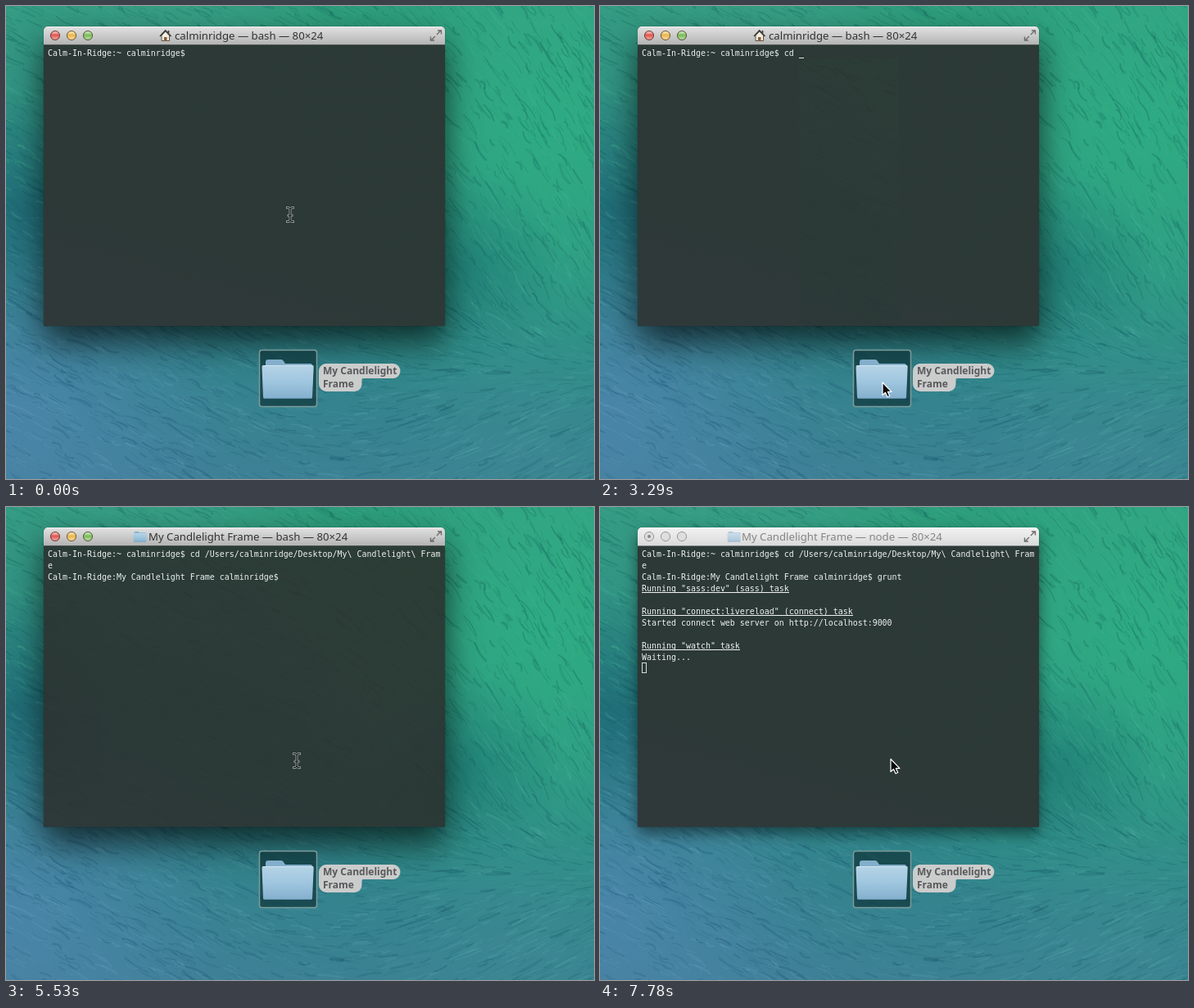
These frames come from a looping animation (718x578 px, 8000 ms). An HTML page with a canvas:

```html
<!DOCTYPE html>
<html lang="en">
<head>
<meta charset="utf-8">
<title>Terminal demo</title>
<style>
  html, body { margin: 0; width: 718px; height: 578px; overflow: hidden; }
  body { position: relative; background: #35898a; }
  canvas, svg { position: absolute; left: 0; top: 0; }
  #win {
    position: absolute; left: 46px; top: 25px; width: 490px; height: 366px;
    border-radius: 5px 5px 0 0; box-shadow: 0 0 1px rgba(0,0,0,.7), 0 20px 42px rgba(0,0,0,.68);
  }
  #win.idle { box-shadow: 0 0 1px rgba(0,0,0,.5), 0 8px 18px rgba(0,0,0,.5); }
  #bar {
    height: 22px; border-radius: 5px 5px 0 0; border-bottom: 1px solid #4d5453; box-sizing: content-box;
    background: linear-gradient(#f2f2f2, #dedede 8%, #b4b4b4);
  }
  .idle #bar { background: linear-gradient(#fafafa, #f0f0f0 10%, #dadada); border-color: #7b8281; }
  #pane { position: relative; height: 343px; background: rgba(44,47,45,.88); }
  #cover { position: absolute; inset: 0; background: linear-gradient(15deg, #30393a, #2c3936 40%); opacity: .9; }
  text { white-space: pre; }
  .mono { font: 9.966px "DejaVu Sans Mono", monospace; fill: #eef2f0; }
  #title { font: 13.2px "Noto Sans", "Open Sans", sans-serif; fill: #333; }
  .label { font: bold 12px "Noto Sans", "Open Sans", sans-serif; fill: #59595b; }
  .idleArt, .idle .liveArt { display: none; }
  .idle .idleArt { display: inline; }
  .idle #title { fill: #858585; }
  .idle #glyph { opacity: .6; }
</style>
</head>
<body>
<canvas id="sea" width="718" height="578"></canvas>
<div id="win"><div id="bar"></div><div id="pane"><div id="cover"></div></div></div>

<svg id="ui" width="718" height="578" viewBox="0 0 718 578">
  <defs>
    <linearGradient id="blue" x2="0" y2="1">
      <stop stop-color="#b5d3e6"/><stop offset=".5" stop-color="#9fc6df"/><stop offset="1" stop-color="#83afcd"/>
    </linearGradient>
    <linearGradient id="gloss" x2="0" y2="1">
      <stop stop-color="#fff" stop-opacity=".75"/><stop offset=".45" stop-color="#fff" stop-opacity=".05"/>
      <stop offset="1" stop-color="#fff" stop-opacity=".5"/>
    </linearGradient>
    <g id="folder">
      <path d="M317 441V435Q317 432 320 432H336Q338 432 339 434L341 437H372Q374 437 374 440V446H317Z" fill="#84aecb"/>
      <path d="M314 439H374Q376 439 375.700 441L374 478Q374 480 372 480H316Q314 480 314 478L312.500 441Q312.500 439 314 439Z" fill="url(#blue)"/>
      <path d="M314 439.500H374.500" stroke="#d2e6f2" fill="none"/>
      <path d="M315 479.500H373" stroke="#628ca8" fill="none"/>
    </g>
    <g id="tag">
      <path d="M390 437H473A8.500 9 0 0 1 473 455H436Q434.500 455 434.500 458V462A9 9 0 0 1 426 471H391A9 9 0 0 1 382 462V446A9 9 0 0 1 390 437Z" fill="#cbcccc"/>
      <text class="label" x="387" y="450">My Candlelight</text>
      <text class="label" x="387" y="466">Frame</text>
    </g>
  </defs>

  <rect x="309.500" y="420.500" width="70" height="69" rx="3" fill="#0c3136" fill-opacity=".68" stroke="#7d9c9b" stroke-width="1.500"/>
  <use href="#folder"/>
  <use href="#tag"/>

  <g id="lights"></g>
  <circle id="busy" cx="60" cy="36" r="2" fill="#4a1714"/>
  <g stroke="#6c6c6c" fill="none" stroke-width="1.400">
    <path d="M526 35L531 30M527 30H531.500V34.500M524 37L519 42M523 42H518.500V37.500"/>
  </g>
  <g id="glyph">
    <g id="home">
      <path d="M190 36V42.500H199.500V36L194.700 31Z" fill="#f4eee0" stroke="#54504a"/>
      <path d="M188 37L194.700 30L201.500 37M198.500 30V33" fill="none" stroke="#3f3c38" stroke-width="1.600"/>
      <path d="M193 43V38H196.500V43Z" fill="#8b5a38"/>
    </g>
    <use id="mini" href="#folder" transform="translate(73.500 -84) scale(.262 .264)"/>
  </g>
  <text id="title" y="41"></text>

  <g id="out" class="mono"></g>
  <rect id="caret"/>

  <g id="ghost" opacity=".55"><use href="#folder"/><use href="#tag"/></g>
  <g id="beam" fill="none" stroke-linecap="square">
    <path id="stem" d="M-3.500-8.500Q0-8.500 0-6Q0-8.500 3.500-8.500M0-6V6M-3.500 8.500Q0 8.500 0 6Q0 8.500 3.500 8.500M-2 1H2" stroke="#9aa5a2" stroke-width="2.600"/>
    <use href="#stem"/>
    <path d="M-3.500-8.500Q0-8.500 0-6Q0-8.500 3.500-8.500M0-6V6M-3.500 8.500Q0 8.500 0 6Q0 8.500 3.500 8.500M-2 1H2" stroke="#101413" stroke-width="1.200"/>
  </g>
  <path id="arrow" d="M0 0V15.500L3.500 12.300L6 17.700L8.700 16.500L6.300 11.300H11Z" fill="#080808" stroke="#fff" stroke-width="1.200" stroke-linejoin="round"/>
</svg>

<script>
const $ = id => document.getElementById(id);
const NS = 'http://www.w3.org/2000/svg';
const W = 718, H = 578, LOOP = 8000;

function add(parent, tag, attrs, text) {
  const el = document.createElementNS(NS, tag);
  for (const k in attrs) el.setAttribute(k, attrs[k]);
  if (text) el.textContent = text;
  parent.append(el);
}

// Wallpaper: soft colour fields with seeded streaks along a bent flow.
function paintSea() {
  const c = $('sea').getContext('2d');
  let seed = 11;
  const rnd = () => (seed = (seed * 16807) % 2147483647) / 2147483647;
  const ease = (a, b, v) => {
    const t = Math.min(1, Math.max(0, (v - a) / (b - a)));
    return t * t * (3 - 2 * t);
  };
  const base = c.createLinearGradient(120, 0, 0, H);
  base.addColorStop(0, '#369d83');
  base.addColorStop(.5, '#2b8685');
  base.addColorStop(1, '#427f9a');
  c.fillStyle = base;
  c.fillRect(0, 0, W, H);

  function blob(x, y, r, rgb, a) {
    const g = c.createRadialGradient(x, y, 0, x, y, r);
    g.addColorStop(0, `rgba(${rgb},${a})`);
    g.addColorStop(1, `rgba(${rgb},0)`);
    c.fillStyle = g;
    c.fillRect(0, 0, W, H);
  }
  blob(670, 150, 380, '45,172,130', .95);
  blob(430, 0, 200, '38,155,115', .5);
  blob(20, 490, 260, '78,134,174', .75);
  blob(20, 250, 150, '25,92,112', .6);
  blob(560, 320, 120, '20,100,105', .45);
  blob(640, 540, 220, '66,138,150', .5);

  c.lineCap = 'round';
  for (let i = 0; i < 5200; i++) {
    const x = rnd() * (W + 40) - 20, y = rnd() * (H + 40) - 20;
    const low = ease(330, 520, y) * ease(230, 560, x);
    const deg = (28 + 32 * ease(300, 700, x)) * (1 - low) - 24 * low + (rnd() - .5) * 14;
    const a = deg * Math.PI / 180, len = 8 + 38 * rnd() * rnd();
    const dx = Math.cos(a) * len, dy = Math.sin(a) * len, bend = (rnd() - .5) * 8;
    const wave = Math.sin((x * Math.sin(a) - y * Math.cos(a)) / 24 + x / 90);
    const dark = rnd() < .5 - .22 * wave;
    const blue = ease(150, 480, y) * (1 - ease(200, 700, x) * .6);
    c.strokeStyle = dark
      ? `rgba(${15 + 12 * blue},${95 - 12 * blue},${88 + 28 * blue},${.1 + .22 * rnd()})`
      : `rgba(${65 + 40 * blue},${180 - 18 * blue},${145 + 48 * blue},${.08 + .2 * rnd()})`;
    c.lineWidth = .8 + 2.6 * rnd() * rnd();
    c.beginPath();
    c.moveTo(x - dx / 2, y - dy / 2);
    c.quadraticCurveTo(x + bend, y - bend, x + dx / 2, y + dy / 2);
    c.stroke();
  }
}

function paintLights() {
  ['#dd4f48', '#eab244', '#74b84e'].forEach((fill, i) => {
    const spot = { cx: 60 + 20 * i, cy: 36, r: 5.6 };
    add($('lights'), 'circle', { ...spot, fill, stroke: 'rgba(60,40,30,.65)', class: 'liveArt' });
    add($('lights'), 'circle', { ...spot, r: 4.8, fill: 'url(#gloss)', class: 'liveArt' });
    add($('lights'), 'circle', { ...spot, fill: '#dedede', stroke: '#999', class: 'idleArt' });
  });
}

const USER = 'calminridge', HOST = 'Calm-In-Ridge', DIR = 'My Candlelight Frame';
const ask = `${HOST}:~ ${USER}$`;
const moved = [`${ask} cd /Users/${USER}/Desktop/My\\ Candlelight\\ Fram`, 'e'];
const ready = `${HOST}:${DIR} ${USER}$ `;
const typed = n => [...moved, ready + 'grunt'.slice(0, n)];
const sass = [...typed(5), 'Running "sass:dev" (sass) task', ''];
const serve = [...sass, 'Running "connect:livereload" (connect) task',
  'Started connect web server on http://localhost:9000', ''];
const watch = [...serve, 'Running "watch" task', 'Waiting...'];

const FLAT = 'none';
const STRIPE = "path(evenodd, 'M0 0H490V343H0ZM197 15H319V343H197Z')";
const CLEAR = 'inset(100%)';

// Each step changes only the named parts; caret is [column, row].
const steps = [
  [0, { name: USER, job: 'bash', text: [ask], caret: null, beam: [347, 255], arrow: null,
        drag: null, cover: FLAT, home: true, busy: false, idle: false }],
  [300, { caret: [29, 0] }],
  [750, { caret: null }],
  [1050, { text: [ask + ' c'], caret: [30, 0] }],
  [1350, { text: [ask + ' cd'], caret: [31, 0] }],
  [1650, { caret: [32, 0] }],
  [2100, { caret: null }],
  [2250, { beam: [349, 285], cover: STRIPE }],
  [2400, { beam: [353, 357], caret: [32, 0] }],
  [2550, { beam: null, arrow: [353, 440] }],
  [2700, { arrow: [350, 499] }],
  [2850, { arrow: [347, 477] }],
  [2990, { arrow: [345, 460], caret: null }],
  [3290, { caret: [32, 0] }],
  [3590, { arrow: [346, 440], drag: [1, -20] }],
  [3740, { arrow: [350, 388], drag: [5, -72], cover: CLEAR }],
  [3880, { arrow: [354, 325], drag: [9, -135] }],
  [4030, { arrow: null, drag: null, beam: [355, 310], text: moved, caret: [2, 1] }],
  [4930, { home: false, name: DIR, text: typed(0), caret: [48, 2] }],
  [5530, { caret: null }],
  [5980, { text: typed(1), caret: [49, 2] }],
  [6130, { text: typed(3), caret: [51, 2] }],
  [6280, { text: typed(4), caret: [52, 2] }],
  [6430, { text: typed(5), caret: [53, 2] }],
  [6730, { caret: null }],
  [6880, { caret: [0, 3], busy: true }],
  [7030, { job: 'node' }],
  [7180, { text: sass, caret: [0, 4] }],
  [7630, { job: 'open', text: serve, caret: [0, 7] }],
  [7780, { job: 'node', text: watch, caret: [0, 10], beam: null, arrow: [355, 308],
           cover: FLAT, idle: true }]
];
let last = {};
const scenes = steps.map(([at, change]) => ({ at, ...(last = { ...last, ...change }) }));

function place(id, pos) {
  $(id).style.display = pos ? '' : 'none';
  if (pos) $(id).setAttribute('transform', `translate(${pos})`);
}

function draw(s) {
  $('win').classList.toggle('idle', s.idle);
  $('ui').classList.toggle('idle', s.idle);
  $('cover').style.clipPath = s.cover;
  $('home').style.display = s.home ? '' : 'none';
  $('mini').style.display = s.home ? 'none' : '';
  $('busy').style.display = s.busy ? '' : 'none';
  $('busy').setAttribute('fill', s.idle ? '#888' : '#4a1714');
  $('title').textContent = `${s.name} — ${s.job} — 80×24`;
  $('title').setAttribute('x', s.home ? 206 : s.job === 'bash' ? 174 : 173);

  $('out').replaceChildren();
  s.text.forEach((line, row) => {
    const y = 61 + 14 * row;
    add($('out'), 'text', { x: 51, y }, line);
    if (line.startsWith('Running'))
      add($('out'), 'rect', { x: 51, y: y + 1, width: 6 * line.length, height: 1 });
  });

  const caret = $('caret');
  caret.style.display = s.caret ? '' : 'none';
  if (s.caret) {
    const x = 51 + 6 * s.caret[0], y = 63 + 14 * s.caret[1];
    const box = s.idle
      ? { x: x + .5, y: y - 12.5, width: 5, height: 12, fill: 'none', stroke: '#d5dad8' }
      : { x, y, width: 6, height: 1, fill: '#e4e8e6', stroke: 'none' };
    for (const k in box) caret.setAttribute(k, box[k]);
  }
  place('beam', s.beam);
  place('arrow', s.arrow);
  place('ghost', s.drag);
}

let shown = null;
const start = performance.now();
function tick() {
  const t = (performance.now() - start) % LOOP;
  const scene = scenes.findLast(s => s.at <= t);
  if (scene !== shown) draw(shown = scene);
  requestAnimationFrame(tick);
}
paintSea();
paintLights();
tick();
</script>
</body>
</html>
```
